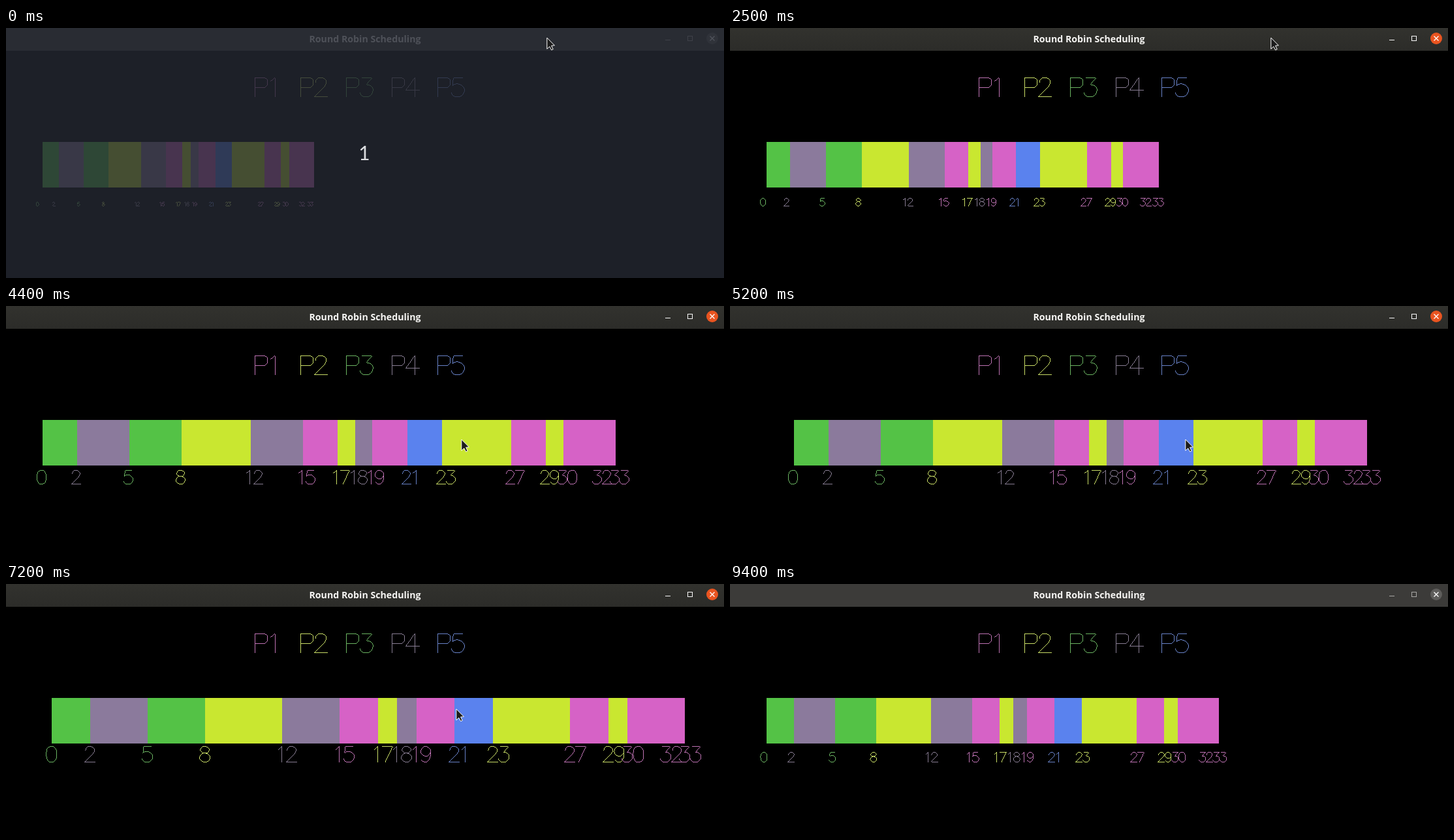
An HTML page with a canvas for the animation above (9.5 s loop, 1100 by 384 pixels).

```html
<!DOCTYPE html>
<html lang="en">
<head>
<meta charset="utf-8">
<title>Round Robin Scheduling</title>
<style>
  html, body { margin: 0; width: 100%; height: 100%; overflow: hidden; background: #000; }
  canvas, svg { position: absolute; left: 0; top: 0; width: 1100px; height: 384px; display: block; }
  .title { font: bold 14.2px "Open Sans", "Noto Sans", sans-serif; fill: #f6f5f3; text-anchor: middle; }
  .count { font: 30px Lato, "Open Sans", sans-serif; fill: #dcdde0; text-anchor: middle; }
  .bar { fill: #3c3b39; }
  .close { fill: #5e5d5b; }
  .icon { stroke: #a9a8a6; fill: none; }
  .cross { stroke: #fff; stroke-width: 1.4; }
  .half .bar { fill: #353432; }
  .half .close { fill: #a4593d; }
  .half .icon { stroke: #d6d5d3; }
  .focus .bar { fill: url(#shade); }
  .focus .close { fill: #e95420; }
  .focus .icon { stroke: #fff; }
</style>
</head>
<body>
<canvas id="chart" width="1100" height="384"></canvas>
<svg viewBox="0 0 1100 384">
  <defs>
    <linearGradient id="shade" x2="0" y2="1">
      <stop stop-color="#32322e"/>
      <stop offset="1" stop-color="#2c2c29"/>
    </linearGradient>
  </defs>
  <g id="head">
    <rect class="bar" width="1100" height="35"/>
    <text class="title" x="550" y="22">Round Robin Scheduling</text>
    <path class="icon" d="M1010 18.5h8"/>
    <rect class="icon" x="1044.5" y="12.5" width="7" height="7"/>
    <circle class="close" cx="1082" cy="16" r="9"/>
    <path class="cross" d="M1078.5 12.5l7 7m0-7l-7 7"/>
  </g>
  <g id="veil">
    <rect width="1100" height="384" fill="#252832" opacity=".8"/>
    <text class="count" x="549" y="203">1</text>
  </g>
  <path id="cursor" d="M.8 1V18.2L4.8 14.5L7.6 19.8L10.2 18.6L7.6 13.2L12.4 12.8Z" fill="#1c1c1c" stroke="#fff"/>
</svg>
<script>
const LOOP = 9500, STEP = 100;
const $ = id => document.getElementById(id);
const ctx = $('chart').getContext('2d');

// block colour and softer lettering colour of each process
const processes = [
  { fill: '#d662c6', ink: '#be72b3' },
  { fill: '#c9e730', ink: '#c9dd66' },
  { fill: '#54c246', ink: '#6ab461' },
  { fill: '#8b7a9c', ink: '#887d93' },
  { fill: '#5a82ee', ink: '#6882c8' }
];

// when each slice begins, and the process that runs in it
const times = [0, 2, 5, 8, 12, 15, 17, 18, 19, 21, 23, 27, 29, 30, 32, 33];
const order = '3432412415212111';

// single-line lettering, 21 units tall
const bowl = '17 14S14.5 21 9.5 21S4 20 3 17';
const strokes = {
  P: 'M4 0V21M4 0H13C16.5 0 18 2 18 5.5S16.5 11 13 11H4',
  0: 'M9 0C5 0 3 4 3 10.5S5 21 9 21H11C15 21 17 17 17 10.5S15 0 11 0Z',
  1: 'M5 4L7 3L10 0V21',
  2: 'M4 5C4 2 6 0 10 0S16 2.5 16 5C16 7.5 14 10 13 11L3 21H17',
  3: 'M5 0H16L10 8C15 8 17 10.5 ' + bowl,
  4: 'M13 0L3 14H18M13 0V21',
  5: 'M15 0H5L4 9C5 7.5 7 7 9.5 7C14 7 17 10 ' + bowl,
  7: 'M3 0H17L7 21',
  8: 'M10 9A6 4.5 0 0 1 10 0A6 4.5 0 0 1 10 9A7 6 0 0 1 10 21A7 6 0 0 1 10 9',
  9: 'M16 6.5A6.5 6.5 0 0 1 3 6.5A6.5 6.5 0 0 1 16 6.5V9C16 16 14 21 9 21C6 21 5 20 4 18'
};
const advance = { P: 16.4, 1: 13 };

// each run: start time, number of even steps, value reached
const pan = [
  [3900, 4, -56], [4400, 1, 56], [4600, 4, 154], [5100, 3, 70], [5500, 1, 42], [5600, 3, 112],
  [6100, 2, 56], [6600, 3, -14], [7100, 2, 70], [7400, 3, 154], [7900, 1, 56]
];
const zoom = [[2500, 1, 13], [2800, 1, 15], [3300, 1, 19], [6200, 1, 21], [7900, 1, 17], [8300, 2, 15]];
const pointer = [
  [3500, 5, 697, 204], [6000, 1, 691, 198], [7100, 1, 689, 191],
  [8300, 1, 685, 194], [8600, 3, 104, 65], [9000, 1, -50, -50]
];

function follow(value, runs, t, axis = 2) {
  for (const run of runs) {
    const [start, steps] = run;
    if (t < start) break;
    const done = Math.min(steps, Math.floor((t - start) / STEP) + 1);
    value += (run[axis] - value) * done / steps;
  }
  return value;
}

function sample(d) {
  const path = document.createElementNS('http://www.w3.org/2000/svg', 'path');
  path.setAttribute('d', d);
  const count = 300, step = path.getTotalLength() / count;
  return Array.from({ length: count + 1 }, (_, i) => path.getPointAtLength(i * step));
}

const glyphs = {};
for (const c in strokes) glyphs[c] = sample(strokes[c]);

// one-pixel line without smoothing; stair corners are dropped
function drawGlyph(c, x, base, k) {
  const dots = [];
  for (const p of glyphs[c]) {
    const px = Math.round(x + p.x * k), py = Math.round(base + (p.y - 21) * k);
    const last = dots.at(-1), prev = dots.at(-2);
    if (last && last[0] === px && last[1] === py) continue;
    if (prev && Math.abs(prev[0] - px) === 1 && Math.abs(prev[1] - py) === 1) dots.pop();
    dots.push([px, py]);
  }
  for (const [px, py] of dots) ctx.fillRect(px, py, 1, 1);
}

function drawText(text, x, base, k, ink) {
  ctx.fillStyle = ink;
  for (const c of text) {
    drawGlyph(c, x, base, k);
    x += (advance[c] || 15) * k;
  }
}

function drawChart(left, scale) {
  const k = (scale - 5) / 14;
  const edge = time => Math.round(left + time * scale * 1.4);
  ctx.clearRect(0, 0, 1100, 384);
  processes.forEach((p, i) => drawText('P' + (i + 1), 375 + 70 * i, 105, 1.4, p.ink));
  times.forEach((time, i) => {
    const { fill, ink } = processes[order[i] - 1];
    const x = edge(time), end = edge(times[i + 1] ?? time);
    ctx.fillStyle = fill;
    ctx.fillRect(x, 175, end - x, 70);
    drawText(String(time), x - 11 - k, 273, k, ink);
  });
}

let shown;
const start = performance.now();

function tick() {
  const t = (performance.now() - start) % LOOP;
  const left = Math.round(follow(56, pan, t) / 14) * 14;
  const scale = follow(9, zoom, t);
  const view = left + ' ' + scale;
  if (view !== shown) drawChart(left, scale);
  shown = view;
  const x = Math.round(follow(828, pointer, t)), y = Math.round(follow(14, pointer, t, 3));
  $('cursor').setAttribute('transform', `translate(${x} ${y})`);
  $('head').setAttribute('class', t < 400 || t >= 9400 ? '' : t < 500 ? 'half' : 'focus');
  $('veil').style.display = t < 100 ? '' : 'none';
  requestAnimationFrame(tick);
}
tick();
</script>
</body>
</html>
```
